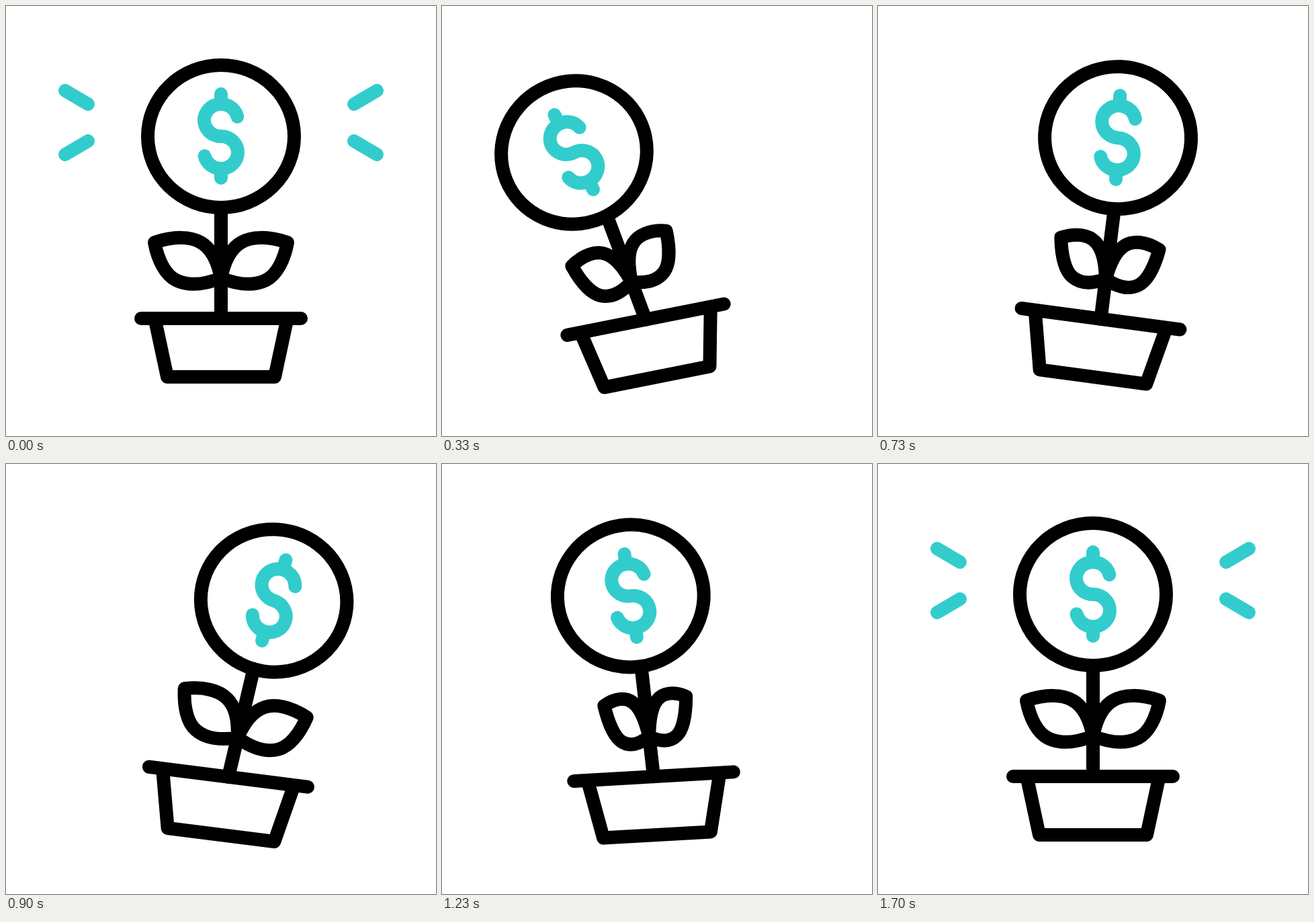
Write an HTML page with a canvas that moves like this. It is 640x640 px and loops after 2000 ms.

```html
<!DOCTYPE html>
<html lang="en">
<head>
<meta charset="utf-8">
<title>Money plant</title>
<style>
html, body { margin: 0; width: 100%; height: 100%; overflow: hidden; background: #fff }
canvas { display: block; width: 640px; height: 640px }
</style>
</head>
<body>
<canvas id="stage" width="640" height="640"></canvas>
<script>
const ctx = document.getElementById('stage').getContext('2d');
const BLACK = '#000', TEAL = '#33cccc';

// Keys are [step, value] pairs at 30 steps per second
const POT = [[0, 0], [13, -13], [24.25, 10], [34, -4.4], [43, 0]];
const STEM = [[0, 0], [16, -13.5], [26, 6.5], [33.5, -3.6], [51, 0]];
const COIN = [[0, 0], [16, -10.2], [30, 5], [39, -3], [51, 0]];
const LEAF = [[6, 1], [17, .19], [25, 1], [34, .56], [47, 1]];
const RAY = [[0, 1], [8, 0], [43, 0], [51, 1]];

function ease(keys, s) {
  if (s <= keys[0][0]) return keys[0][1];
  for (let i = 1; i < keys.length; i++) {
    const [a, from] = keys[i - 1], [b, to] = keys[i];
    if (s < b) {
      const x = (s - a) / (b - a);
      return from + (to - from) * x * x * (3 - 2 * x);
    }
  }
  return keys[keys.length - 1][1];
}

function turn(x, y, degrees) {
  ctx.translate(x, y);
  ctx.rotate(degrees * Math.PI / 180);
  ctx.translate(-x, -y);
}

function line(color, ...points) {
  ctx.strokeStyle = color;
  ctx.beginPath();
  for (const [x, y] of points) ctx.lineTo(x, y);
  ctx.stroke();
}

// Only the outline is squeezed; the line keeps its weight
function leaf(scale) {
  ctx.save();
  ctx.translate(320, 405);
  ctx.scale(scale, 1);
  ctx.beginPath();
  ctx.moveTo(0, 0);
  ctx.bezierCurveTo(-5, -25, -14, -44, -30, -53);
  ctx.bezierCurveTo(-45, -62, -70, -63, -99, -53);
  ctx.bezierCurveTo(-94, -27, -83, -5, -67, 3);
  ctx.bezierCurveTo(-47, 13, -23, 9, 0, 0);
  ctx.closePath();
  ctx.restore();
  ctx.strokeStyle = BLACK;
  ctx.stroke();
}

function coin() {
  ctx.strokeStyle = BLACK;
  ctx.beginPath();
  ctx.ellipse(320, 194, 109, 106, 0, 0, 7);
  ctx.stroke();

  line(TEAL, [320, 131], [320, 146]);
  line(TEAL, [320, 242], [320, 256]);
  ctx.beginPath();
  ctx.ellipse(320, 170, 25, 24, 0, -.22, Math.PI / 2, true);
  ctx.ellipse(320, 218, 25, 24, 0, -Math.PI / 2, Math.PI - .22);
  ctx.stroke();
}

function rays(grow) {
  if (grow <= 0) return;
  for (const side of [-1, 1])
    for (const [y, dy] of [[146, -20], [201, 20]])
      line(TEAL, [320 + side * 198, y], [320 + side * (198 + 34 * grow), y + dy * grow]);
}

function draw(now) {
  const s = Math.floor((now % 2000 + 4) * .03) % 60;
  ctx.setTransform(1, 0, 0, 1, 0, 0);
  ctx.fillStyle = '#fff';
  ctx.fillRect(0, 0, 640, 640);
  ctx.lineWidth = 20;
  ctx.lineCap = ctx.lineJoin = 'round';

  rays(ease(RAY, s));
  turn(320, 552, ease(POT, s));
  line(BLACK, [201, 465], [439, 465]);
  line(BLACK, [222, 468], [240, 552], [400, 552], [418, 468]);

  turn(320, 465, ease(STEM, s));
  line(BLACK, [320, 300], [320, 465]);
  const spread = ease(LEAF, s);
  leaf(spread);
  leaf(-spread);

  turn(320, 300, ease(COIN, s));
  coin();
  requestAnimationFrame(draw);
}
draw(0);
</script>
</body>
</html>
```
